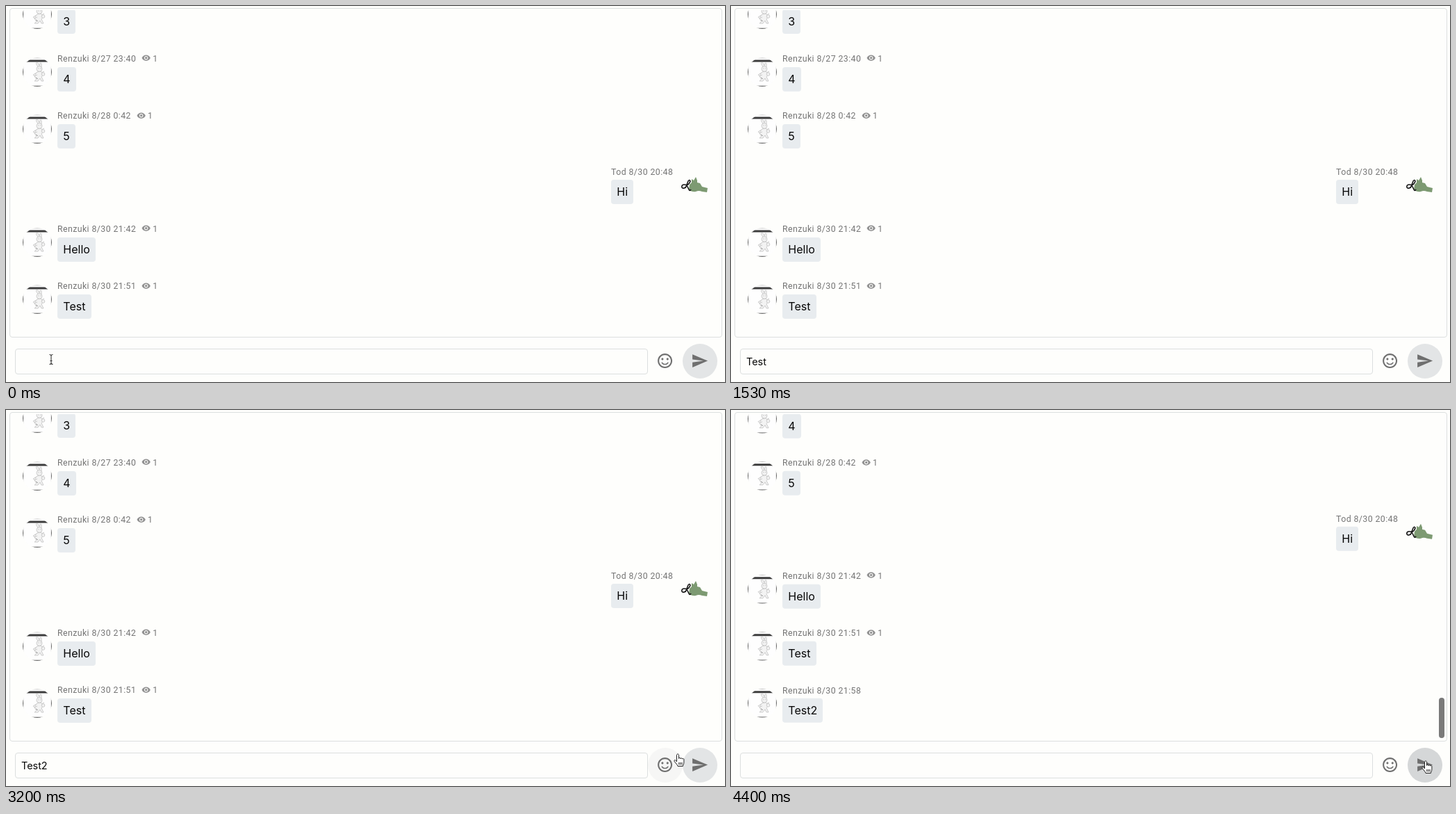
Write an HTML page that moves like this. It is 1035 px wide and 541 px high and loops after 4.46 s.

```html
<!DOCTYPE html>
<html lang="en">
<head>
<meta charset="utf-8">
<title>Chat</title>
<style>
html, body { margin: 0; width: 100%; height: 100%; overflow: hidden; background: #fefefc; }
body *, svg { position: absolute; box-sizing: border-box; }
svg { overflow: visible; }
svg * { position: static; }
#panel { left: 5px; top: 3px; width: 1026px; height: 474px; border: 1px solid #dcdfdf; border-radius: 4px; }
#view { left: 6px; top: 6px; width: 1024px; height: 466px; overflow: hidden; }
#list { left: -6px; top: -6px; }
.label { height: 16px; display: flex; align-items: center; white-space: pre;
  font: 12.35px/16px Roboto, sans-serif; letter-spacing: .41px; color: #757575; }
.label * { position: static; }
.label svg { width: 13.4px; height: 13.4px; margin: -2px 2.8px 0 7.8px; fill: #929292; }
.bubble { height: 35px; padding: 0 8.3px; border-radius: 4px; background: #e8ecef; white-space: pre;
  font: 16px/35px Inter, sans-serif; color: #060606; }
#bar { left: 1019px; width: 8px; height: 58px; border-radius: 4px; background: #7a7a7a; }
#field { left: 13px; top: 493px; width: 911px; height: 37px; border: 1px solid #dcdfdf; border-radius: 4px; }
#entry { left: 22px; top: 502px; height: 19px; display: flex; align-items: center; white-space: pre;
  font: 14.4px/19px Inter, sans-serif; color: #060606; }
#entry * { position: static; }
#caret { width: 1.3px; height: 18px; background: #111; }
.round { width: 50px; height: 50px; border-radius: 50%; top: 486px; }
.round svg { left: 12.4px; top: 12.4px; width: 25.2px; height: 25.2px; fill: #6f6f6f; }
#smile { left: 923.5px; }
#send { left: 973.5px; }
</style>
</head>
<body>
<svg width="0" height="0">
  <defs>
    <clipPath id="disc"><circle r="20.8"/></clipPath>
    <path id="eye" d="M12 4.5C7 4.5 2.73 7.61 1 12c1.73 4.39 6 7.5 11 7.5s9.27-3.11 11-7.5c-1.73-4.39-6-7.5-11-7.5zM12 17c-2.76 0-5-2.24-5-5s2.24-5 5-5 5 2.24 5 5-2.24 5-5 5zm0-8c-1.66 0-3 1.34-3 3s1.34 3 3 3 3-1.34 3-3-1.34-3-3-3z"/>
    <g id="pale">
      <g clip-path="url(#disc)">
        <circle r="20.8" fill="#fefefe"/>
        <path d="M-20-20.2H20" stroke="#bbb"/>
        <path d="M-20-16H20" stroke="#3c3c3c" stroke-width="3"/>
        <path d="M-20.5-20V20M20.5-20V20M-20 20.3H20" stroke="#444" stroke-width="1.2"/>
      </g>
      <g fill="#f3f3f3" stroke="#c6c6c6" stroke-width=".9">
        <path d="M1-8C-3-12-2-15 1-13L3-9C3-13 6-15 6-11L6-7"/>
        <path d="M0 0C-5 4-4 8-1 10L-4 13H1L4 9 6 13H9L6 7C9 4 8 1 5-1Z"/>
        <ellipse cx="3" cy="-4.5" rx="4" ry="3.8"/>
        <path d="M-1 1L-6 4-4 6 0 4M6 1L10-1" fill="none"/>
        <circle cx="8.5" cy="3" r="2.3"/>
      </g>
      <path d="M1.5-5h.8M4.5-5h.8M-2 8l3 2" stroke="#999"/>
    </g>
    <g id="green">
      <path d="M-7-1L-4-4-4-9-1-7 2-12 4-7 4-4 8-3 11 2 19 4 18 10 11 9Q6 7 2 9Q-4 10-8 6Z" fill="#7d9a72"/>
      <path d="M-13 4L-9-6Q-7-9-6-6 -7-2-11 0C-15-2-19-1-18 3-16 6-12 3-11 0L-8 6Q-7 9-5 6" fill="none" stroke="#161616" stroke-width="1.6"/>
    </g>
  </defs>
</svg>
<div id="panel"></div>
<div id="view"><div id="list"></div></div>
<div id="bar"></div>
<div id="field"></div>
<div id="entry"><span id="typed"></span><span id="caret"></span></div>
<div id="smile" class="round"><svg viewBox="0 0 24 24"><path d="M11.99 2C6.47 2 2 6.48 2 12s4.47 10 9.99 10C17.52 22 22 17.52 22 12S17.52 2 11.99 2zM12 20c-4.42 0-8-3.58-8-8s3.58-8 8-8 8 3.58 8 8-3.58 8-8 8zm3.5-9c.83 0 1.5-.67 1.5-1.5S16.33 8 15.5 8 14 8.67 14 9.5s.67 1.5 1.5 1.5zm-7 0c.83 0 1.5-.67 1.5-1.5S9.33 8 8.5 8 7 8.67 7 9.5 7.67 11 8.5 11zM12 16c-1.48 0-2.75-.81-3.45-2H6.88c.8 2.05 2.79 3.5 5.12 3.5s4.32-1.45 5.12-3.5h-1.67c-.7 1.19-1.97 2-3.45 2z"/></svg></div>
<div id="send" class="round"><svg viewBox="0 0 24 24"><path d="M2.01 21L23 12 2.01 3 2 10l15 2-15 2z"/></svg></div>
<svg id="mouse" width="1" height="1" style="left:0;top:0">
  <path id="beam" d="M-2.5-7Q0-7 0-5Q0-7 2.5-7M0-5V5M-2.5 7Q0 7 0 5Q0 7 2.5 7M-1.5 2h3" fill="none" stroke="#333" stroke-width="1.1"/>
  <path id="arrow" d="M0 0V13.5L3.2 10.6 5.3 15.3 7.6 14.3 5.6 9.8H10Z" fill="#111" stroke="#fff"/>
  <path id="hand" transform="translate(-5.5)" d="M4 1.5c0-2 3-2 3 0v5c0-1.6 2.6-1.4 2.6.3 0-1.4 2.5-1.2 2.5.4 0-1.2 2.3-1 2.3.6v4c0 3-1.5 3.5-1.5 5.7H5.5c0-2-4-5-5-7.2-.6-1.8 1.4-2.2 2.3-.8L4 11zM7.3 12v3.5M9.4 12v3.5M11.5 12v3.5" fill="#fff" stroke="#222"/>
</svg>
<script>
const LOOP = 4460, STEP = 200 / 3, PITCH = 82.25;
const SENT = 3730, SCROLL_START = 3890, SCROLL_TIME = 360;
const $ = id => document.getElementById(id);
const clamp = v => Math.max(0, Math.min(1, v));
const show = (el, on) => el.style.visibility = on ? 'visible' : 'hidden';

// [text, time, own message]
const messages = [
  ['3', '8/27 23:38'], ['4', '8/27 23:40'], ['5', '8/28 0:42'], ['Hi', '8/30 20:48', true],
  ['Hello', '8/30 21:42'], ['Test', '8/30 21:51'], ['Test2', '8/30 21:58']
];
$('list').innerHTML = messages.map(([text, time, own], i) => {
  const y = -6.2 + PITCH * i - (i > 2 ? 1.8 : 0);
  const x = own ? 871 : 74;
  const seen = own || i === 6 ? '' : '<svg viewBox="0 0 24 24"><use href="#eye"/></svg><span>1</span>';
  const face = own ? ['green', 991, 19.5] : ['pale', 45, 18.5];
  return `<div class="label" style="left:${x}px;top:${y - 8}px"><span>${own ? 'Tod' : 'Renzuki'} ${time}</span>${seen}</div>
    <div class="bubble" style="left:${x}px;top:${y + 11.5}px">${text}</div>
    <svg width="1" height="1" style="left:${face[1]}px;top:${y + face[2]}px"><use href="#${face[0]}"/></svg>`;
}).join('');

// [time, text]: the caret restarts its blink at each edit
const edits = [[270, ''], [530, 'T'], [670, 'Te'], [800, 'Tes'], [930, 'Test'], [2470, 'Test2'], [SENT, '']];
// [time, x, y]
const path = [[0, 65, 508.5], [2400, 65, 508.5], [2600, 281, 444], [2900, 690, 452], [3200, 967, 495], [3400, 1000, 505], [LOOP, 1000, 505]];

function mouseAt(t) {
  const i = path.findIndex(p => p[0] > t);
  const [a, b] = [path[i - 1], path[i]];
  const u = (t - a[0]) / (b[0] - a[0]);
  return [a[1] + (b[1] - a[1]) * u, a[2] + (b[2] - a[2]) * u];
}

function draw(t) {
  const edit = edits.filter(e => e[0] <= t + 1).pop();
  $('typed').textContent = edit ? edit[1] : '';
  show($('caret'), edit && (t - edit[0]) % 1060 < 530);

  const u = clamp((t - SCROLL_START) / SCROLL_TIME);
  const scroll = PITCH * u * u * (3 - 2 * u);
  $('list').style.transform = `translateY(${-scroll}px)`;
  $('bar').style.top = 414 - (PITCH - scroll) * .142 + 'px';
  show($('bar'), u > 0);

  const [x, y] = mouseAt(t);
  const over = cx => Math.hypot(x - cx, y - 511) < 25.5;
  const moving = t >= 2400;
  const kind = !moving ? 'beam' : over(948.5) || over(998.5) ? 'hand' : y > 493 && x < 923 ? 'beam' : 'arrow';
  $('mouse').style.transform = `translate(${x}px,${y}px)`;
  for (const id of ['beam', 'arrow', 'hand']) show($(id), id === kind && (t < 530 || moving));

  $('smile').style.background = moving && over(948.5) ? '#f6f6f5' : 'none';
  const hover = clamp((t - 3270) / 200);
  const press = clamp((t - SENT) / 150) * clamp((4300 - t) / 250);
  const tone = 229 - 14 * hover - 7 * press;
  $('send').style.background = `rgb(${tone - 2},${tone},${tone + 1})`;
}

function frame(now) {
  // motion advances in fifteen steps a second
  draw(Math.floor((now % LOOP + 7) / STEP) * STEP % LOOP);
  requestAnimationFrame(frame);
}
draw(0);
requestAnimationFrame(frame);
</script>
</body>
</html>
```
